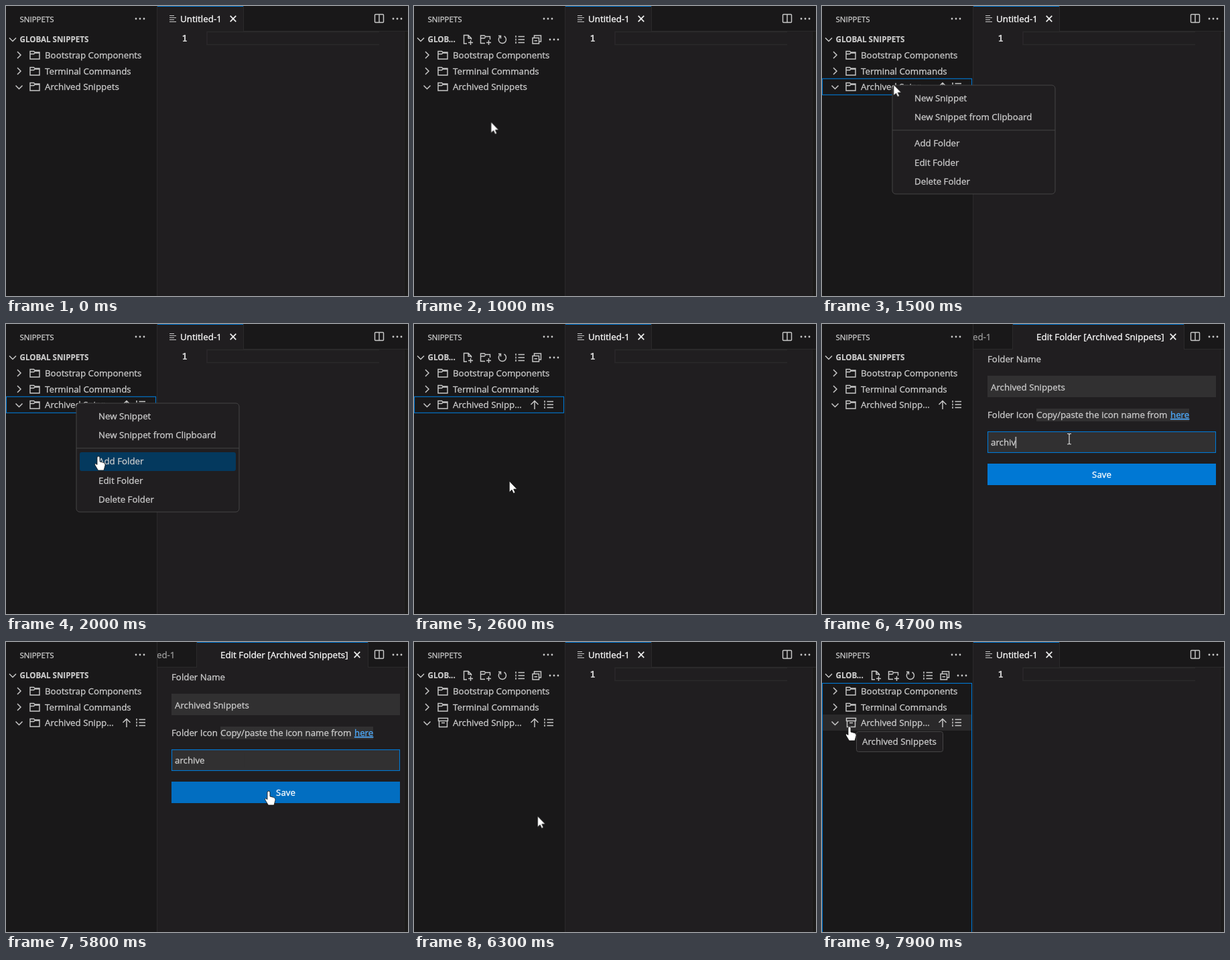
Animation, 600 px wide and 432 px high, one loop 8000 ms. Source, as an HTML page:

```html
<!DOCTYPE html>
<html lang="en">
<head>
<meta charset="utf-8">
<title>Snippet folder icon</title>
<style>
html,body{margin:0;width:100%;height:100%;overflow:hidden;background:#201e20}
svg{display:block;width:600px;height:432px}
text{font:13.3px 'Open Sans','Noto Sans',sans-serif;color:#ccc;fill:currentColor;stroke:currentColor;stroke-width:.3;white-space:pre}
.title{font-size:11.5px}
.head{font-size:11.6px;font-weight:700;stroke-width:.15}
.tab{font-size:13.4px;color:#fff}
.num{font:700 14px 'Noto Sans Mono','DejaVu Sans Mono',monospace;stroke:none}
.ico{fill:none;stroke:#c8c8c8;stroke-width:1.45}
.dots{fill:#c8c8c8;stroke:none}
.line{fill:none;stroke:#0078d4;stroke-width:1.1}
.a{animation:8s step-end infinite;visibility:hidden}

.editor{animation-name:editor}
.form{animation-name:form}
.body{animation-name:body}
.focus{animation-name:focus}
.caret{animation-name:caret}
.hfull{animation-name:hfull}
.hacts{animation-name:hacts}
.rfull{animation-name:rfull}
.racts{animation-name:racts}
.folder{animation-name:folder}
.archive{animation-name:archive}
.hover{animation-name:hover}
.rline{animation-name:rline}
.tline{animation-name:tline}
.menu{animation-name:menu}
.pick{animation-name:pick}
.press{animation-name:press}
.tip{animation-name:tip}
.arrow{animation-name:arrow}
.hand{animation-name:hand}
.beam{animation-name:beam}
.typed{animation:typed 8s step-end infinite}
.mouse{animation:mouse 8s linear infinite}

@keyframes editor{0%,74.95%{visibility:visible}33.7%{visibility:hidden}}
@keyframes form{0%,74.95%{visibility:hidden}33.7%{visibility:visible}}
@keyframes body{0%,74.95%{visibility:hidden}36.2%{visibility:visible}}
@keyframes focus{0%,74.95%{visibility:hidden}43.7%{visibility:visible}}
@keyframes caret{0%,48.7%,66.2%{visibility:hidden}43.7%,49.95%{visibility:visible}}
@keyframes hfull{0%,18.7%,43.7%{visibility:visible}6.2%,32.45%,78.7%{visibility:hidden}}
@keyframes hacts{0%,18.7%,43.7%{visibility:hidden}6.2%,32.45%,78.7%{visibility:visible}}
@keyframes rfull{0%{visibility:visible}16.2%{visibility:hidden}}
@keyframes racts{0%{visibility:hidden}16.2%{visibility:visible}}
@keyframes folder{0%{visibility:visible}74.95%{visibility:hidden}}
@keyframes archive{0%{visibility:hidden}74.95%{visibility:visible}}
@keyframes hover{0%,17.45%{visibility:hidden}16.2%,88.7%{visibility:visible}}
@keyframes rline{0%,43.7%{visibility:hidden}17.45%{visibility:visible}}
@keyframes tline{0%,18.7%{visibility:hidden}17.45%,82.45%{visibility:visible}}
@keyframes menu{0%,32.45%{visibility:hidden}18.7%{visibility:visible}}
@keyframes pick{
  0%,32.45%{visibility:hidden;transform:none}
  22.4%{visibility:visible;transform:none}
  23.7%{visibility:visible;transform:translateY(28px)}
  24.9%{visibility:visible;transform:translateY(68px)}
  28.5%{visibility:visible;transform:translateY(96px)}
}
@keyframes press{0%,74.95%{visibility:hidden}69.9%{visibility:visible}}
@keyframes tip{0%{visibility:hidden}96.2%{visibility:visible}}
@keyframes arrow{0%,15.6%,22.4%,37.4%,88.7%{visibility:hidden}6.2%,18.7%,32.45%,77.9%{visibility:visible}}
@keyframes hand{0%,18.7%,32.45%,74.95%{visibility:hidden}15.6%,22.4%,69.9%,88.7%{visibility:visible}}
@keyframes beam{0%,69.9%,77.9%{visibility:hidden}37.4%,74.95%{visibility:visible}}
@keyframes typed{
  0%{transform:none}
  49.95%{transform:translateX(7.4px)}
  51.2%{transform:translateX(12.8px)}
  53.7%{transform:translateX(19.1px)}
  56.2%{transform:translateX(27.3px)}
  57.45%{transform:translateX(30.6px)}
  58.7%{transform:translateX(37.3px)}
  59.95%{transform:translateX(44.8px)}
}
@keyframes mouse{
  0%,6.2%{transform:translate(150px,415px);animation-timing-function:ease-out}
  16.2%,21.2%{transform:translate(106.5px,117px)}
  22.5%{transform:translate(114px,143px)}
  23.75%{transform:translate(127px,172px)}
  24.95%,26.25%{transform:translate(138px,197px)}
  30%,35%{transform:translate(142px,234px);animation-timing-function:ease-in-out}
  39.9%,66.2%{transform:translate(369px,171px);animation-timing-function:ease-out}
  71.2%,76.3%{transform:translate(392px,222px)}
  77.5%{transform:translate(300px,240px)}
  78.7%{transform:translate(185px,258.5px);animation-timing-function:ease-out}
  81.2%,82.5%{transform:translate(165px,275px)}
  87.5%{transform:translate(80px,140px)}
  88.7%{transform:translate(70px,128px);animation-timing-function:ease-out}
  93.7%,100%{transform:translate(41px,126px)}
}
</style>
</head>
<body>
<svg viewBox="0 0 600 432" xmlns="http://www.w3.org/2000/svg">
<defs>
  <g id="dots" class="dots"><circle cx="-6" r="1.4"/><circle r="1.4"/><circle cx="6" r="1.4"/></g>
  <path id="close" d="M-4.3-4.3 4.3 4.3M4.3-4.3-4.3 4.3" style="stroke:#eee;stroke-width:1.7"/>
  <path id="right" class="ico" d="M-2.5-5 2.5 0-2.5 5"/>
  <path id="down" class="ico" d="M-5-2.5 0 2.5 5-2.5"/>
  <path id="fold" class="ico" d="M-7 6V-5.500H-1.500L0-4H7V6ZM-7-1.500H-1.500L0-3H7"/>
  <path id="list" class="ico" d="M-2.500-4.500H7M-2.500 0H7M-2.500 4.500H7M-6-6V-3M-6-1.500V1.500M-6 3V6"/>
</defs>

<!-- editor area -->
<rect width="600" height="432" fill="#201e20"/>
<rect x="226" width="374" height="37" fill="#191819"/>
<path d="M226 37.500H600" stroke="#2b2a2b"/>
<path d="M594.500 38V432" stroke="#242324"/>
<rect x="595" y="38" width="5" height="394" fill="#1c1b1a"/>

<g class="a editor">
  <rect x="226" width="128" height="38" fill="#201e20"/>
  <path d="M226 .5H354" class="line"/>
  <path d="M354.500 0V37" stroke="#2b2a2b"/>
  <path class="ico" d="M244 14.500H251M244 17.500H254M244 20.500H251M244 23.500H254" style="stroke-width:1.200"/>
  <text class="tab" x="260" y="24">Untitled-1</text>
  <use href="#close" x="339" y="19"/>
  <text class="num" x="262.500" y="53">1</text>
  <path d="M557 38.500H300V57.500H557" fill="none" stroke="#2b292b" stroke-width="1.500"/>
</g>

<g class="a form">
  <text x="191" y="24" style="color:#9d9d9d">Untitled-1</text>
  <rect x="285" width="255" height="38" fill="#201e20"/>
  <path d="M285 .5H540" class="line"/>
  <path d="M284.500 0V37M540.500 0V37" stroke="#2b2a2b"/>
  <text class="tab" x="320" y="24">Edit Folder [Archived Snippets]</text>
  <use href="#close" x="524" y="19"/>
</g>

<g class="a body">
  <text x="247" y="57">Folder Name</text>
  <rect x="247" y="77" width="341" height="32" fill="#313031"/>
  <text x="252" y="98.500">Archived Snippets</text>
  <text x="247" y="140">Folder Icon</text>
  <rect x="320" y="126" width="228" height="19" fill="#313031"/>
  <text x="320" y="140">Copy/paste the icon name from</text>
  <text x="520" y="140" style="color:#4daafc;text-decoration:underline">here</text>
  <rect x="247" y="160" width="341" height="32" fill="#313031"/>
  <rect x="247" y="208" width="341" height="32" fill="#0078d4"/>
  <rect class="a press" x="247" y="208" width="341" height="32" fill="#026ec1"/>
  <text x="417.500" y="229" text-anchor="middle" style="color:#fff">Save</text>
</g>
<g class="a focus">
  <rect class="line" x="247.500" y="160.500" width="340" height="31"/>
  <text x="252" y="181">archive</text>
  <g class="typed">
    <rect x="252" y="165" width="60" height="22" fill="#313031"/>
    <path class="a caret" d="M252 168V185" stroke="#e0e0e0" stroke-width="1.300"/>
  </g>
</g>

<g class="ico">
  <rect x="550.500" y="12.500" width="13" height="12" rx="1"/>
  <path d="M557 12.500V24.500"/>
</g>
<use href="#dots" x="584" y="19"/>

<!-- side bar -->
<rect width="226" height="432" fill="#191819"/>
<path d="M225.500 0V432" stroke="#2b2a2b"/>
<text class="title" x="20.500" y="23.500">SNIPPETS</text>
<use href="#dots" x="200" y="19"/>

<use href="#down" x="10" y="50"/>
<text class="head a hfull" x="20.500" y="54">GLOBAL SNIPPETS</text>
<g class="a hacts">
  <text class="head" x="20.500" y="54">GLOB...</text>
  <g class="ico">
    <path d="M79 56H74.500V43.500H81L85.500 48V50M81 43.500V48H85.500M84.500 51V58M81 54.500H88"/>
    <path d="M106 55.500H99.500V44H105L106.500 45.500H113.500V50M99.500 48H105L106.500 46.500M111.500 51V58M108 54.500H115"/>
    <path d="M128.500 45.500A5.600 5.600 0 1 0 134.500 45M126 44.500H129.500V48.500"/>
    <path d="M179.500 47V44H189.500V53H186.500M177 47.500H186.500V56H177ZM179.500 51.700H184"/>
  </g>
  <use href="#list" x="158" y="50"/>
  <use href="#dots" x="209" y="50"/>
</g>

<rect class="a hover" y="108" width="224" height="24" fill="#2a292a"/>
<use href="#right" x="19.500" y="73"/>
<use href="#fold" x="43" y="73"/>
<text x="58" y="77.800">Bootstrap Components</text>
<use href="#right" x="19.500" y="97"/>
<use href="#fold" x="43" y="97"/>
<text x="58" y="101.500">Terminal Commands</text>
<use href="#down" x="19.500" y="121"/>
<use class="a folder" href="#fold" x="43" y="120"/>
<path class="a archive ico" d="M36.500 113.500H50.500V117.500H36.500ZM37.500 117.500V126.500H49.500V117.500M41 120.500H46"/>
<text class="a rfull" x="58" y="125">Archived Snippets</text>
<g class="a racts">
  <text x="58" y="125">Archived Snipp...</text>
  <path class="ico" d="M180 127V114.500M174.500 120 180 114.500 185.500 120"/>
  <use href="#list" x="201" y="120"/>
</g>
<rect class="a rline line" x=".5" y="108.300" width="223" height="24"/>
<rect class="a tline line" x=".5" y="61.500" width="223" height="372"/>

<!-- context menu -->
<g class="a menu">
  <rect x="105" y="118" width="243" height="162" rx="5" fill="#201e20" stroke="#454445"/>
  <path d="M105 185H348" stroke="#454445"/>
  <rect class="a pick" x="110" y="123" width="233" height="28" rx="3" fill="#04395e"/>
  <text x="138" y="141.800">New Snippet</text>
  <text x="138" y="170">New Snippet from Clipboard</text>
  <text x="138" y="209.300">Add Folder</text>
  <text x="138" y="237.500">Edit Folder</text>
  <text x="138" y="265.700">Delete Folder</text>
</g>

<g class="a tip">
  <rect x="51.500" y="133.500" width="129" height="30" rx="3" fill="#201e20" stroke="#454445"/>
  <text x="60" y="153">Archived Snippets</text>
</g>

<!-- pointer -->
<g class="mouse">
  <path class="a arrow" d="M.3 0V16.500L4 13 6.500 18.300 9 17.200 6.700 12H11.700Z" fill="#fff" stroke="#111" stroke-width=".7"/>
  <path class="a hand" d="M-2 2Q-2 0 0 0T2 2V8L7.500 9.500Q10.500 10.300 10 13.500L8 21H-.5L-5 13.500Q-6 11.500-4.500 10.800L-2 12.500Z" fill="#fff" stroke="#111" stroke-width=".8"/>
  <path class="a beam" d="M-3-7.500H-1L0-6.500 1-7.500H3M0-6.500V7M-3 8H-1L0 7 1 8H3" fill="none" stroke="#ddd" stroke-width="1.200"/>
</g>
</svg>
</body>
</html>
```
